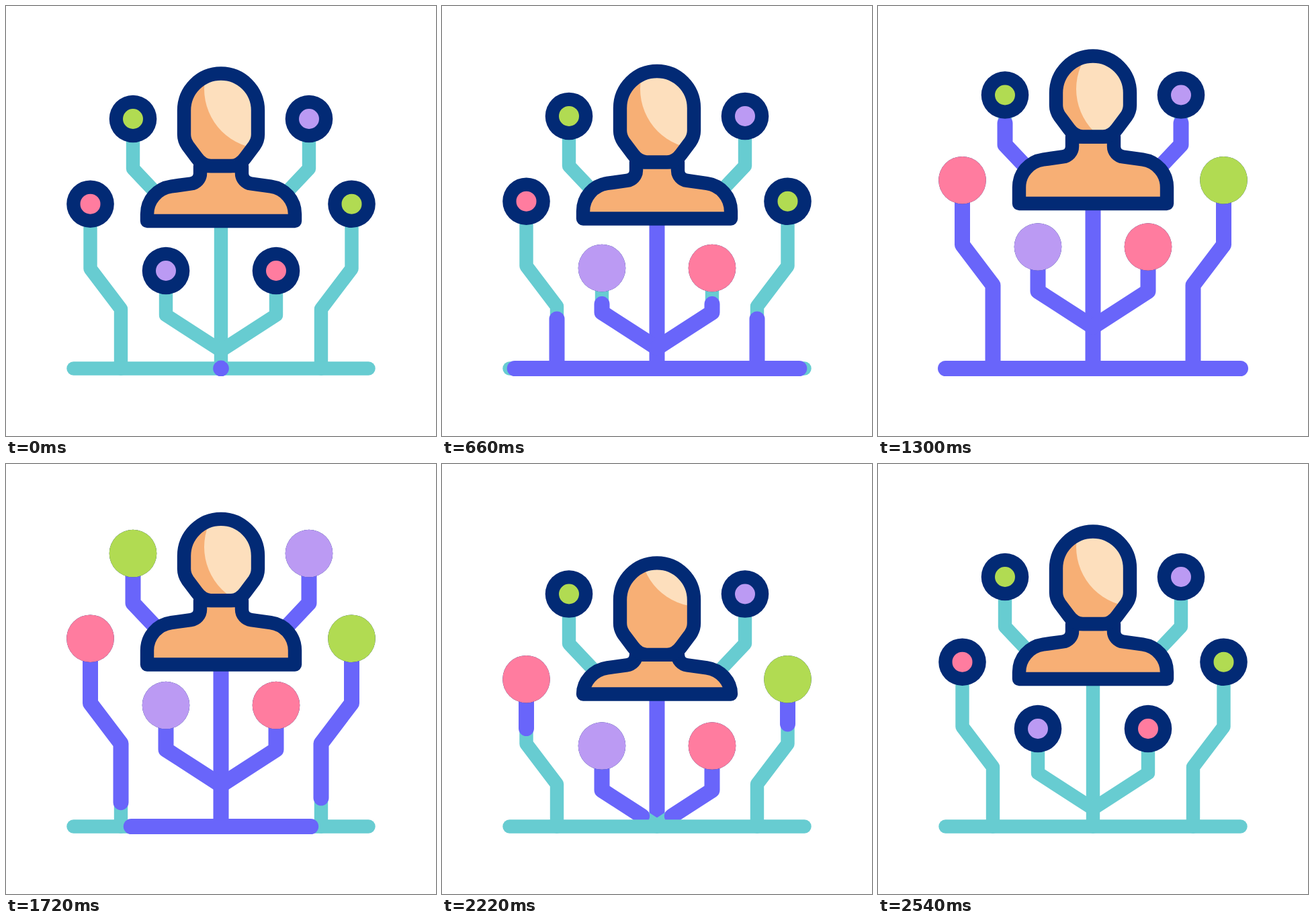
An HTML page that plays this animation: 640 px wide and 640 px high, repeating every 2600 ms.

```html
<!DOCTYPE html>
<html lang="en">
<head>
<meta charset="utf-8">
<title>Growing network</title>
<style>
  html, body { margin: 0; width: 100%; height: 100%; overflow: hidden; background: #fff; }
  svg { display: block; width: 100%; height: 100%; }
  .teal, .violet, .navy { fill: none; stroke-linecap: round; stroke-linejoin: round; }
  .teal { stroke: #67ccd1; stroke-width: 20.4; }
  .violet { stroke: #6965fa; stroke-width: 23; }
  .navy { stroke: #022a75; stroke-width: 20.4; }
</style>
</head>
<body>
<svg id="stage" viewBox="0 0 640 640">
  <defs><clipPath id="headClip"><path id="clipShape"/></clipPath></defs>
</svg>
<script>
const LOOP = 2600;
const stage = document.getElementById('stage');
const clipShape = document.getElementById('clipShape');

function add(tag, attrs) {
  const el = document.createElementNS('http://www.w3.org/2000/svg', tag);
  set(el, attrs);
  return stage.appendChild(el);
}
function set(el, attrs) {
  for (const k in attrs) el.setAttribute(k, attrs[k]);
}
const ramp = (t, a, b) => Math.min(1, Math.max(0, (t - a) / (b - a)));
const smooth = x => x * x * (3 - 2 * x);

// Vertical offsets of each moving part
const TIMES = [0, 320, 660, 980, 1300, 1540, 1720, 2210, 2540, 2600];
const TRACKS = {
  nodes:    [0, 0, -4, -23.5, -35.5, -37, -35, 25.6, 0, 0],
  base:     [0, 0, -3.5, -19, -26, -27, -21.5, 22.6, 0, 0],
  shoulder: [0, 0, -4.5, -28, -40, -41.3, -32.5, 35, 0, 0],
  chin:     [0, 0, -5.6, -31, -43.5, -44.8, -35, 46, 0, 0],
  crown:    [0, 0, -3.5, -19, -26, -27, -18.7, 47, 0, 0]
};

// Monotone cubic interpolation
function track(name, t) {
  const v = TRACKS[name];
  const slope = i => (v[i + 1] - v[i]) / (TIMES[i + 1] - TIMES[i]);
  const tangent = i => {
    if (i === 0 || i === v.length - 1) return 0;
    const a = slope(i - 1), b = slope(i);
    return a * b <= 0 ? 0 : 2 * a * b / (a + b);
  };
  let i = 0;
  while (i < TIMES.length - 2 && t >= TIMES[i + 1]) i++;
  const d = TIMES[i + 1] - TIMES[i], x = (t - TIMES[i]) / d, y = 1 - x;
  return v[i] * y * y * (1 + 2 * x) + v[i + 1] * x * x * (3 - 2 * x)
    + d * x * y * (tangent(i) * y - tangent(i + 1) * x);
}

const GREEN = '#b1db52', LILAC = '#bb9af3', PINK = '#ff7c9f';

// Each path runs from its root to its node
const mirror = pts => pts.map(([x, y, fixed]) => [640 - x, y, fixed]);
const inner = [[320, 513], [238, 460], [238, 394]];
const side = [[171, 539.5, true], [171, 451], [125.5, 391], [125.5, 294.7]];
const upper = [[240, 296], [189, 242], [189, 168]];

const branches = [
  { pts: [[320, 539.5, true], [320, 315]], grow: [0, 520], wipe: [2200, 2500] },
  { pts: inner, grow: [310, 832], wipe: [2165, 2510], color: LILAC, fill: [460, 640], empty: [2330, 2510] },
  { pts: mirror(inner), grow: [310, 832], wipe: [2165, 2510], color: PINK, fill: [460, 640], empty: [2330, 2510] },
  { pts: side, grow: [508, 1057], wipe: [1614, 2497], color: PINK, fill: [1000, 1180], empty: [2300, 2490] },
  { pts: mirror(side), grow: [508, 1057], wipe: [1595, 2470], color: GREEN, fill: [1000, 1180], empty: [2300, 2490] },
  { pts: upper, grow: [985, 1425], wipe: [1690, 2140], color: GREEN, fill: [1330, 1510], empty: [1980, 2160] },
  { pts: mirror(upper), grow: [985, 1425], wipe: [1690, 2140], color: LILAC, fill: [1330, 1510], empty: [1980, 2160] }
];
for (const b of branches) {
  b.under = add('path', { class: 'teal' });
  b.over = add('path', { class: 'violet', pathLength: 1 });
}

add('path', { class: 'teal', d: 'M100.5 539.5H539.5' });
const ground = add('path', { class: 'violet' });

for (const b of branches) {
  if (!b.color) continue;
  const cx = b.pts[b.pts.length - 1][0];
  b.ring = add('circle', { cx, r: 35.3, fill: '#022a75' });
  b.dot = add('circle', { cx, fill: b.color });
}

const body = add('path', { class: 'navy', style: 'fill:#f7af75' });
const face = add('path', { fill: '#f7af75' });
add('circle', { cx: 384, cy: 123.5, r: 89, fill: '#fddfbd', 'clip-path': 'url(#headClip)' });
const head = add('path', { class: 'navy' });

function headPath(top, chin) {
  const y = n => n + chin;
  return `M265 ${155.5 + top}A55 55 0 0 1 375 ${155.5 + top}V${y(191)}`
    + `C375 ${y(197)} 373 ${y(203)} 369.5 ${y(208)}L356 ${y(226)}`
    + `C350.5 ${y(233.5)} 343 ${y(238)} 335 ${y(238)}H305`
    + `C297 ${y(238)} 289.5 ${y(233.5)} 284 ${y(226)}L270.5 ${y(208)}`
    + `C267 ${y(203)} 265 ${y(197)} 265 ${y(191)}Z`;
}

function bodyPath(chin, shoulder, base) {
  const y = n => n + shoulder, low = 320 + base;
  const arm = Math.min(y(310), low);
  return `M289 ${238 + chin}V${y(249)}C289 ${y(257)} 283 ${y(263.5)} 275 ${y(264.5)}`
    + `L246 ${y(268.5)}C225 ${y(271.5)} 210 ${y(289)} 210 ${arm}V${low}H430V${arm}`
    + `C430 ${y(289)} 415 ${y(271.5)} 394 ${y(268.5)}L365 ${y(264.5)}`
    + `C357 ${y(263.5)} 351 ${y(257)} 351 ${y(249)}V${238 + chin}Z`;
}

function trim(el, from, to) {
  const len = to - from;
  el.style.display = len > 0.001 ? '' : 'none';
  set(el, { 'stroke-dasharray': `${Math.max(len, 0.001)} 9`, 'stroke-dashoffset': -from });
}

function draw(t) {
  const lift = track('nodes', t);
  for (const b of branches) {
    const d = 'M' + b.pts.map(([x, y, fixed]) => `${x} ${fixed ? y : y + lift}`).join('L');
    set(b.under, { d });
    set(b.over, { d });
    trim(b.over, ramp(t, ...b.wipe), ramp(t, ...b.grow));
    if (b.color) {
      const cy = b.pts[b.pts.length - 1][1] + lift;
      const full = smooth(ramp(t, ...b.fill)) - smooth(ramp(t, ...b.empty));
      set(b.ring, { cy });
      set(b.dot, { cy, r: 15 + 20.3 * full });
    }
  }

  const half = 219.5 * (ramp(t, 0, 685) - ramp(t, 1420, 2190));
  ground.style.display = half > 0.1 ? '' : 'none';
  set(ground, { d: `M${320 - half} 539.5H${320 + half}` });

  const chin = track('chin', t);
  const d = headPath(track('crown', t), chin);
  for (const el of [face, head, clipShape]) set(el, { d });
  set(body, { d: bodyPath(chin, track('shoulder', t), track('base', t)) });
}

const start = performance.now();
function frame() {
  draw((performance.now() - start) % LOOP);
  requestAnimationFrame(frame);
}
frame();
</script>
</body>
</html>
```
